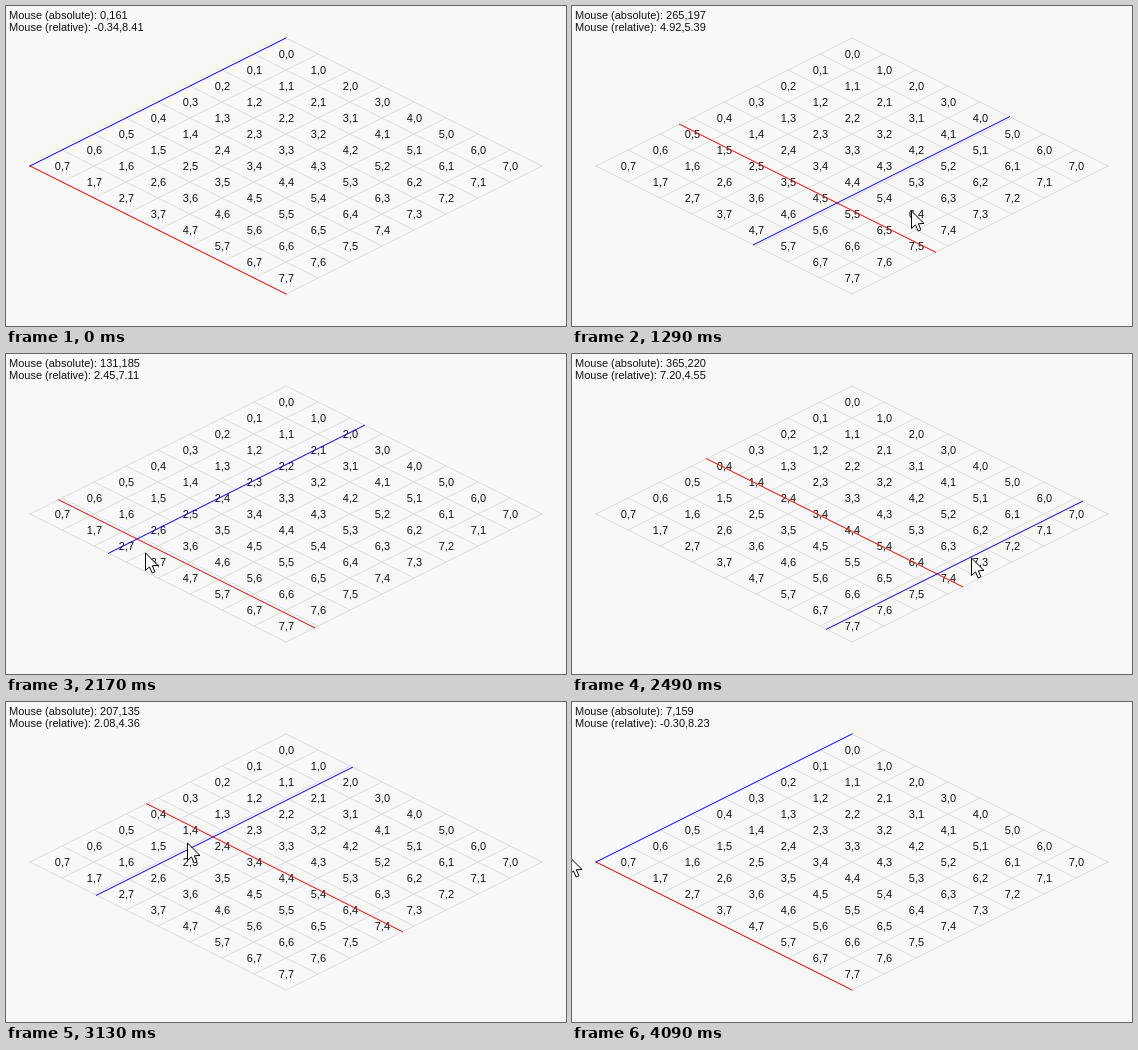
An HTML page with a canvas that plays this animation: 560x320 px, repeating every 4.13 s.

```html
<!DOCTYPE html>
<html lang="en">
<head>
<meta charset="utf-8">
<title>Isometric mouse coordinates</title>
<style>
  html, body { margin: 0; width: 100%; height: 100%; overflow: hidden; background: #f8f8f8; }
  canvas { display: block; }
</style>
</head>
<body>
<canvas id="stage" width="560" height="320"></canvas>
<script>
const ctx = document.getElementById('stage').getContext('2d');

const SIZE = 8, HALF_W = 32, HALF_H = 16, ORIGIN = { x: 280, y: 32 };
const LOOP = 4130, START = 690, STEP = 40;

// Turning points of the two laps the mouse makes around the board.
const PATH = [
  { step: 0, x: 0, y: 161 },
  { step: 15, x: 265, y: 197 },
  { step: 16, x: 340, y: 206 },
  { step: 20, x: 438, y: 153 },
  { step: 25, x: 385, y: 106 },
  { step: 27, x: 317, y: 79 },
  { step: 31, x: 198, y: 97 },
  { step: 37, x: 131, y: 185 },
  { step: 42, x: 255, y: 247 },
  { step: 48, x: 434, y: 176 },
  { step: 53, x: 363, y: 117 },
  { step: 55, x: 340, y: 112 },
  { step: 68, x: 72, y: 165 },
  { step: 82, x: 7, y: 159 },
  { step: 85, x: 7, y: 159 },
  { step: 86, x: -2, y: 156 }
];

const clamp = (v, lo, hi) => Math.min(hi, Math.max(lo, v));

const speed = (i, axis) => (PATH[i + 1][axis] - PATH[i][axis]) / (PATH[i + 1].step - PATH[i].step);

// Harmonic mean of the speeds on both sides; zero at extremes and at the ends.
function slope(i, axis) {
  if (i === 0 || i === PATH.length - 1) return 0;
  const before = speed(i - 1, axis), after = speed(i, axis);
  return before * after > 0 ? 2 * before * after / (before + after) : 0;
}

// Monotone cubic interpolation between the turning points.
function mouseAt(step) {
  let i = 0;
  while (PATH[i + 2] && PATH[i + 1].step <= step) i++;
  const a = PATH[i], b = PATH[i + 1];
  const span = b.step - a.step, u = (step - a.step) / span;
  const ease = u * u * (3 - 2 * u);
  const along = axis => Math.round(
    a[axis] + (b[axis] - a[axis]) * ease +
    span * u * (1 - u) * ((1 - u) * slope(i, axis) - u * slope(i + 1, axis)));
  return { x: along('x'), y: along('y') };
}

const toScreen = (x, y) => [ORIGIN.x + (x - y) * HALF_W, ORIGIN.y + (x + y) * HALF_H];

function toGrid({ x, y }) {
  const across = (x - ORIGIN.x) / HALF_W, down = (y - ORIGIN.y) / HALF_H;
  return { x: (down + across) / 2, y: (down - across) / 2 };
}

function drawLine(color, from, to) {
  ctx.strokeStyle = color;
  ctx.beginPath();
  ctx.moveTo(...toScreen(...from));
  ctx.lineTo(...toScreen(...to));
  ctx.stroke();
}

const drawRow = (color, y) => drawLine(color, [0, y], [SIZE, y]);
const drawColumn = (color, x) => drawLine(color, [x, 0], [x, SIZE]);

function drawBoard() {
  for (let i = 0; i <= SIZE; i++) {
    drawRow('#ddd', i);
    drawColumn('#ddd', i);
  }
  ctx.textAlign = 'center';
  for (let y = 0; y < SIZE; y++) {
    for (let x = 0; x < SIZE; x++) {
      const [cx, cy] = toScreen(x + 0.5, y + 0.5);
      ctx.fillText(`${x},${y}`, cx + 0.5, cy + 4);
    }
  }
}

function drawCursor({ x, y }) {
  const arrow = new Path2D('M0 0V17L4 13.4L6.7 19.5L9.4 18.3L6.8 12.3L12 12Z');
  ctx.save();
  ctx.translate(x - 0.5, y - 0.5);
  ctx.fillStyle = '#fff';
  ctx.strokeStyle = '#000';
  ctx.fill(arrow);
  ctx.stroke(arrow);
  ctx.restore();
}

function draw(time) {
  const step = Math.floor((time - START) / STEP);
  const mouse = mouseAt(Math.max(0, step));
  const grid = toGrid(mouse);

  ctx.fillStyle = '#f8f8f8';
  ctx.fillRect(0, 0, 560, 320);
  ctx.fillStyle = '#111';
  ctx.font = '11px Arial, "Liberation Sans", sans-serif';
  ctx.lineWidth = 1;
  ctx.lineCap = 'square';
  drawBoard();

  ctx.textAlign = 'left';
  ctx.fillText(`Mouse (absolute): ${mouse.x},${mouse.y}`, 3, 13);
  ctx.fillText(`Mouse (relative): ${grid.x.toFixed(2)},${grid.y.toFixed(2)}`, 3, 25);

  drawRow('#f00', clamp(grid.y, 0, SIZE));
  drawColumn('#00f', clamp(grid.x, 0, SIZE));

  // The pointer runs one step ahead of the reported position.
  if (step >= 0) drawCursor(mouseAt(step + 1));
}

function tick() {
  draw(performance.now() % LOOP);
  requestAnimationFrame(tick);
}
tick();
</script>
</body>
</html>
```
